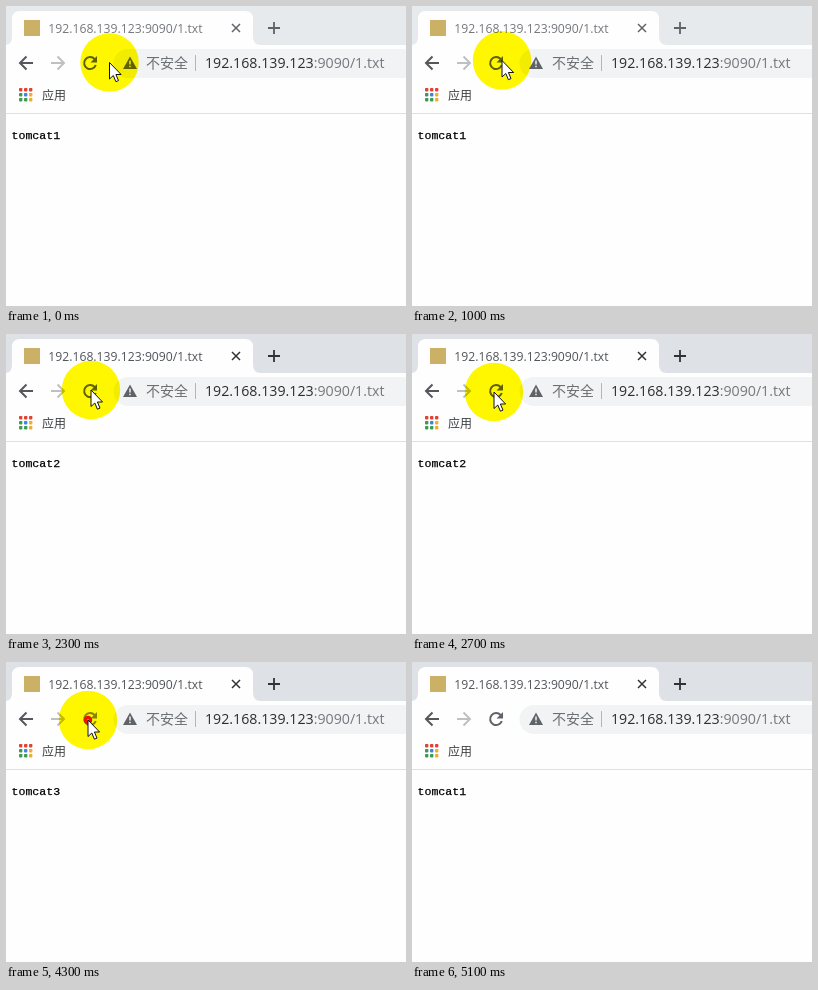
These frames come from a looping animation (400 px wide and 300 px high, 5.5 s). An HTML page:

```html
<!DOCTYPE html>
<html lang="zh">
<head>
<meta charset="utf-8">
<title>Page reload</title>
<style>
  html, body { margin: 0; width: 100%; height: 100%; overflow: hidden; background: #fefefe; }
  svg { display: block; width: 100vw; height: 100vh; }
  .ui { font-family: "Open Sans", "Noto Sans", sans-serif; }
  .cjk { font-family: "Noto Sans CJK SC", "Noto Sans CJK", sans-serif; }
  .mono { font-family: "Liberation Mono", "DejaVu Sans Mono", monospace; }
  .line { fill: none; stroke-width: 2; }
  #halo { mix-blend-mode: multiply; }
</style>
</head>
<body>
<svg viewBox="0 0 400 300">
  <rect width="400" height="300" fill="#fefefe"/>

  <rect id="strip" width="400" height="39"/>
  <path d="M0 39Q6 38 6 31V13Q6 5 14 5H239Q247 5 247 13V31Q247 38 254 39Z" fill="#fefefe"/>
  <rect x="18" y="14" width="16" height="16" fill="#cbb066"/>
  <text id="title" class="ui" x="42.3" y="27" font-size="12.2">192.168.139.123:9090/1.txt</text>
  <g id="tabIcons" class="line">
    <path d="M226 18l8 8m0 -8l-8 8" stroke-width="1.5"/>
    <path d="M262 22h12m-6 -6v12" stroke-width="1.8"/>
  </g>

  <path class="line" d="M27 57H14m6.5 -6.5L14 57l6.5 6.5" stroke="#55575c"/>
  <path class="line" d="M45 57H58m-6.5 -6.5L58 57l-6.5 6.5" stroke="#bfc0c2"/>
  <g id="reload">
    <path class="line" d="M88.6 53A6 6 0 1 0 89.8 59" stroke="#5f6368"/>
    <path d="M91 50v6.5h-6.5Z" fill="#5f6368"/>
  </g>

  <path d="M400 43H122a14.5 14.5 0 0 0 0 29H400Z" fill="#f1f3f4"/>
  <path d="M124 50.5L131 63H117Z" fill="#5f6368"/>
  <path d="M124 54.5v4m0 1.2v1.6" stroke="#f1f3f4" stroke-width="1.5"/>
  <text class="cjk" x="140" y="62" font-size="14" fill="#6c6f73">不安全</text>
  <path d="M189.5 49v16" stroke="#b4b6b9"/>
  <text class="ui" x="199" y="62" font-size="14.2" fill="#2b2d30">192.168.139.123<tspan fill="#75787c">:9090/1.txt</tspan></text>

  <g id="apps"></g>
  <text class="cjk" x="36" y="94" font-size="12" fill="#3c4043">应用</text>
  <path d="M0 107.5H400" stroke="#dfe0e2"/>

  <text id="page" class="mono" x="5.5" y="133" font-size="11.6" stroke="#000" stroke-width=".25"></text>

  <circle id="halo" r="29.2" fill="#fff800"/>
  <circle id="ring" fill="none" stroke="#ee1500" stroke-width="3.5"/>
  <path id="arrow" d="M0 0V16.5L3.8 13L6.4 19.2L9 18.1L6.4 12H11.6Z" fill="#fff" stroke="#111" stroke-linejoin="round"/>
</svg>
<script>
const LOOP = 5500, STEP = 100, EXIT = 5100, LOAD = 200, RING = 300;
const $ = id => document.getElementById(id);
const set = (id, attrs) => {
  for (const key in attrs) $(id).setAttribute(key, attrs[key]);
};

// Pointer path: time, x, y
const path = [
  [0, 103.5, 56.5], [500, 90, 54.5], [2100, 90, 54.5], [2300, 85, 56],
  [2700, 82, 58], [4400, 82, 58], [4600, 112, 64], [4800, 100, 71],
  [4900, 150, 95], [5000, 375, 250], [EXIT, 430, 330]
];
const clicks = [1400, 2800, 4300];
const FOCUS = clicks[0];

const dots = ["#df4432", "#df4432", "#df4432", "#3c9b50", "#4582d8", "#efae2c", "#3c9b50", "#3c9b50", "#efae2c"];
$("apps").innerHTML = dots.map((color, i) =>
  `<rect x="${13 + i % 3 * 5}" y="${82 + Math.floor(i / 3) * 5}" width="3.4" height="3.4" rx=".8" fill="${color}"/>`
).join("");

function pointerAt(t) {
  const i = Math.max(1, path.findIndex(p => p[0] >= t));
  const [t0, x0, y0] = path[i - 1], [t1, x1, y1] = path[i];
  const k = (t - t0) / (t1 - t0);
  return [x0 + (x1 - x0) * k, y0 + (y1 - y0) * k];
}

function draw(now) {
  const t = Math.floor(now % LOOP / STEP) * STEP;
  const focused = t >= FOCUS;
  set("strip", { fill: focused ? "#dee1e6" : "#e7eaed" });
  set("title", { fill: focused ? "#505358" : "#74777c" });
  set("tabIcons", { stroke: focused ? "#303236" : "#5f6368" });

  const loaded = clicks.filter(at => t >= at + LOAD).length;
  $("page").textContent = "tomcat" + (loaded % 3 + 1);

  const loading = clicks.some(at => t >= at && t < at + LOAD);
  set("reload", { opacity: loading ? 0.75 : 1 });

  const visibility = t < EXIT ? "visible" : "hidden";
  const [x, y] = pointerAt(Math.min(t, EXIT));
  const transform = `translate(${x} ${y})`;
  set("halo", { transform, visibility });
  set("arrow", { transform, visibility });

  const click = clicks.find(at => t >= at && t < at + RING);
  set("ring", {
    transform,
    r: click === undefined ? 0 : 2.5 + (t - click) / 40,
    visibility: click === undefined ? "hidden" : "visible"
  });
}

const start = performance.now();
function tick() {
  draw(performance.now() - start);
  requestAnimationFrame(tick);
}
tick();
</script>
</body>
</html>
```
